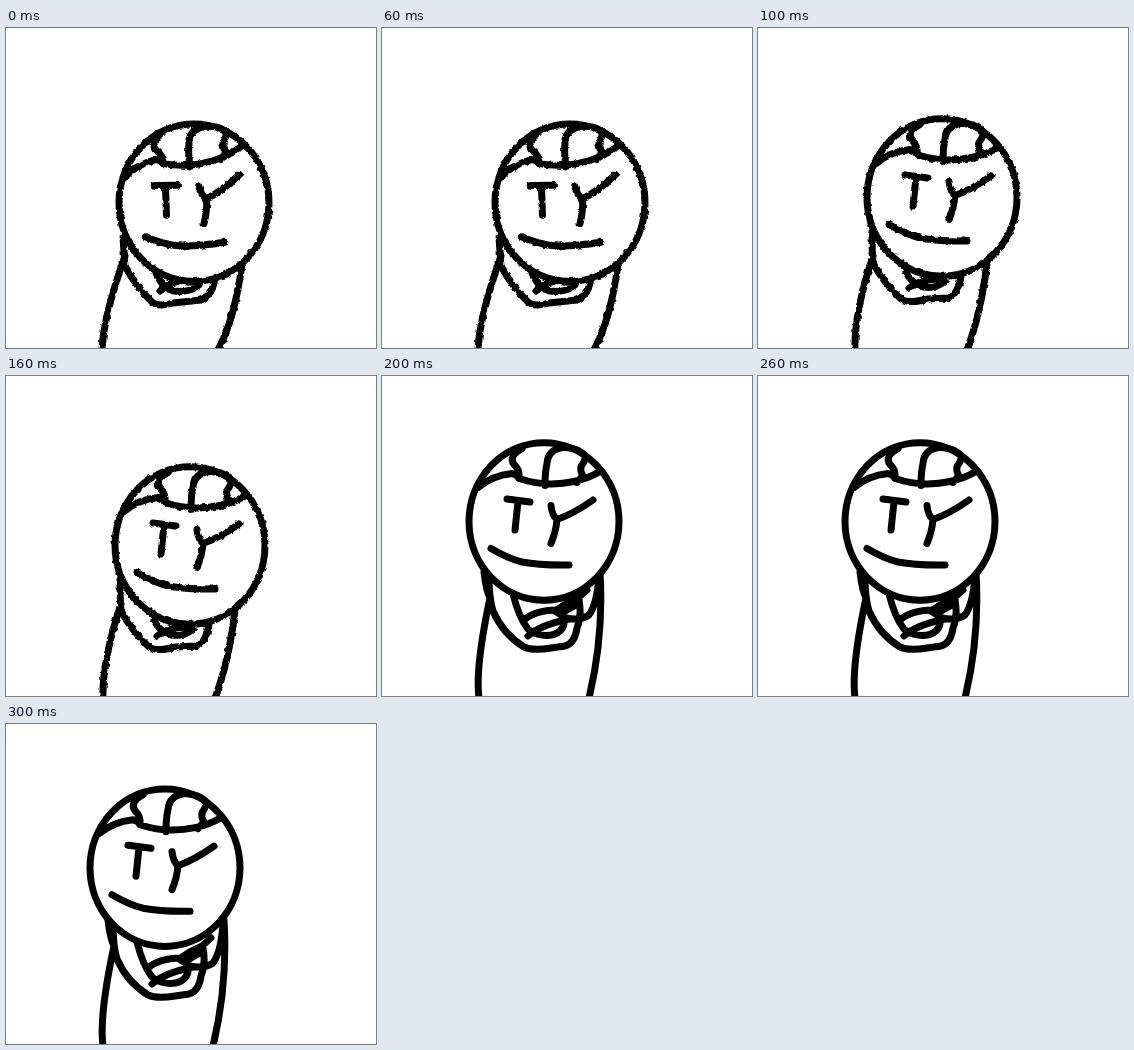
These frames come from a looping animation (370x320 px, 400 ms). An HTML page:

```html
<!DOCTYPE html>
<html lang="en">
<head>
<meta charset="utf-8">
<title>Nodding doodle</title>
<style>
  html, body { margin: 0; width: 100%; height: 100%; overflow: hidden; background: #fff; }
  svg { display: block; width: 370px; height: 320px; }
  path, ellipse { fill: none; stroke: #000; stroke-width: 7; stroke-linecap: round; stroke-linejoin: round; }
  ellipse { fill: #fff; }
</style>
</head>
<body>
<svg viewBox="0 0 370 320">
  <filter id="rough" filterUnits="userSpaceOnUse" x="0" y="0" width="370" height="330" color-interpolation-filters="sRGB">
    <feTurbulence type="fractalNoise" baseFrequency="0.25" numOctaves="1" seed="4"/>
    <feDisplacementMap in="SourceGraphic" scale="3.5" xChannelSelector="R" yChannelSelector="G"/>
  </filter>
  <g id="ink">
    <path id="body"/>
    <g id="head">
      <ellipse rx="75" ry="78.7"/>
      <g id="face">
        <!-- hair -->
        <path d="M-66-34Q-52-46-32-48Q-27-47-25-43Q2-34 30-40Q44-43 56-50
                 M-22-73Q-36-65-30-57Q-24-52-25-43
                 M19-74Q4-72 3-58Q1-50 1-36
                 M22-74Q38-72 41-65Q42-62 37-55Q36-50 39-46L33-39"/>
        <!-- eyes and mouth -->
        <path d="M-37-22.500L-14-19.500M-26-20L-29 8.500
                 M7-16Q8-6 13-2Q30-8 49-21.500M13-2Q12 10 7 22
                 M-53 27Q-36 37-22 40.500Q-4 44 25 43.500"/>
      </g>
    </g>
  </g>
</svg>
<script>
const STEP = 100;
const part = id => document.getElementById(id);

const low = `M117 210Q118 224 119 238Q131 260 147 275Q153 279 167 275L195 272Q206 267 208 255
  M119 228Q97 290 96 322M236 236Q229 290 212 322
  M150 245Q156 260 168 263Q184 265 193 257M154 263Q164 253 180 252`;
const rising = `M114 204Q114 222 115 235Q126 255 143 271Q150 276 170 271L190 270Q200 267 203 248
  M115 228Q96 285 97 322M229 235Q223 285 209 322
  M148 244Q153 256 166 259Q178 261 187 253M151 260Q160 252 180 251`;
const high = `M107 200Q107 222 111 235Q121 258 142 271Q151 275 169 272L183 270Q193 267 195 252Q200 240 197 224
  M102 196Q104 214 108 222Q93 292 97 322M218 196Q222 260 207 322
  M131 218Q137 242 146 253Q155 261 170 259Q183 255 182 244
  M146 260Q158 249 187 243M141 245Q152 234 176 234
  M217 200Q215 228 207 239Q198 245 184 242L173 235Q184 227 196 222L205 214
  M178 238L192 230`;

const poses = [
  { x: 188, y: 174.7, turn: -8, rough: true, body: low },
  { x: 184, y: 169.5, turn: 0, rough: true, body: rising },
  { x: 162, y: 145.5, turn: 0, rough: false, body: high },
  { x: 159, y: 143.7, turn: 0, rough: false, body: high }
];

let shown = -1;

function show(index) {
  const pose = poses[index];
  part('head').setAttribute('transform', `translate(${pose.x} ${pose.y})`);
  part('face').setAttribute('transform', `rotate(${pose.turn})`);
  part('ink').setAttribute('filter', pose.rough ? 'url(#rough)' : 'none');
  part('body').setAttribute('d', pose.body);
  shown = index;
}

function tick() {
  const index = Math.floor(performance.now() / STEP) % poses.length;
  if (index !== shown) show(index);
  requestAnimationFrame(tick);
}

tick();
</script>
</body>
</html>
```
